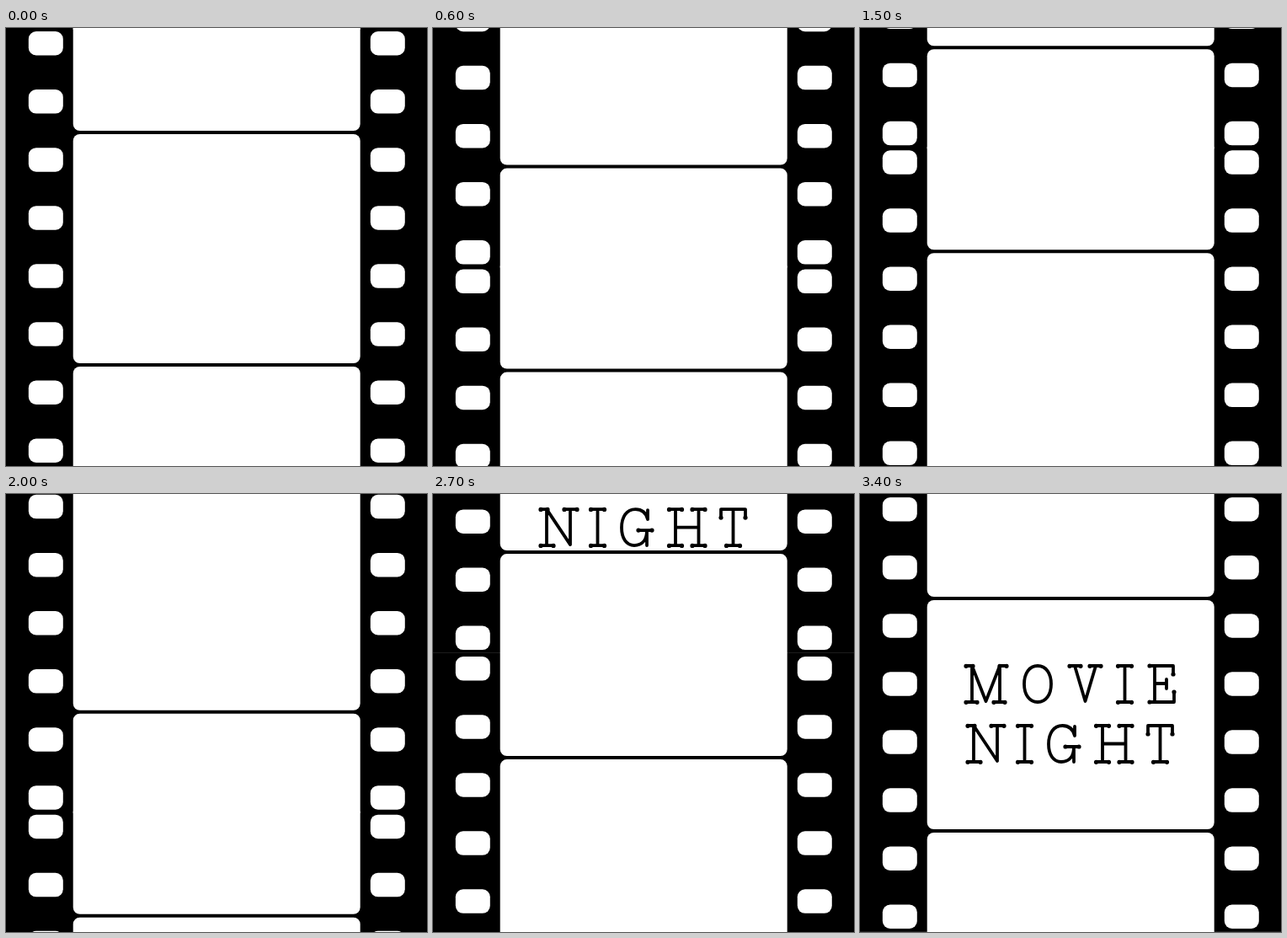
Animation of 500 by 520 pixels, one loop 3.5 s. Source, as an HTML page with a canvas:

```html
<!DOCTYPE html>
<html lang="en">
<head>
<meta charset="utf-8">
<title>Film strip</title>
<style>
  html, body { margin: 0; width: 100%; height: 100%; overflow: hidden; background: #000; }
  canvas { display: block; }
</style>
</head>
<body>
<canvas id="stage" width="500" height="520" role="img" aria-label="MOVIE NIGHT"></canvas>
<script>
const ctx = document.getElementById('stage').getContext('2d');
const STEP = 100, STEPS = 35, TITLE_START = 24;
const TOP = 204, BASE = 247, LINE = 71;

// Typewriter lettering: pen strokes plus round knobs at the serif ends.
const pen = new Path2D(), knobs = new Path2D();
const stroke = (d) => pen.addPath(new Path2D(d));
const knob = (x, y) => knobs.addPath(new Path2D(`M${x} ${y}h.01`));
function serif(x1, x2, y) {
  stroke(`M${x1} ${y}H${x2}`);
  knob(x1, y + 0.3);
  knob(x2, y + 0.3);
}
function stem(x, y) {
  stroke(`M${x} ${TOP + y}V${BASE + y}`);
}
function letterI(x, y) {
  stem(x, y);
  serif(x - 8, x + 8, TOP + y);
  serif(x - 8, x + 8, BASE + y);
}

function buildMovie() {
  stroke('M133 247V204L149.5 246L166 204V247'); // M
  serif(126, 134, TOP);
  serif(166, 174, TOP);
  serif(126, 139, BASE);
  serif(159, 172, BASE);
  stroke('M211 204C221 204 227 213 227 225.500S221 247 211 247S195 238 195 225.500S201 204 211 204Z'); // O
  stroke('M255 204L267.500 246L280 204'); // V
  serif(249, 262, TOP);
  serif(273, 286, TOP);
  letterI(314.5, 0);
  stem(350, 0); // E
  stroke('M344 204H372V214M350 225H364M364 220V231M344 247H373V235');
  knob(344, TOP);
  knob(344, BASE);
  knob(372, 214);
  knob(373, 235);
}

function buildNight() {
  const top = TOP + LINE, base = BASE + LINE;
  stroke('M135 318V275L163 317V275'); // N
  serif(128, 136, top);
  serif(156, 171, top);
  serif(128, 143, base);
  letterI(195.5, LINE);
  stroke('M255 287C253 279 248 275 240.500 275C230 275 224 284 224 297C224 310 230 318 239 318C248 318 254 312 254 300'); // G
  stroke('M255 276V287M254 300V318M244 300H260');
  knob(244, 300);
  knob(260, 300);
  for (const x of [288, 315.5]) { // H
    stem(x, LINE);
    serif(x - 7.5, x + 7.5, top);
    serif(x - 7.5, x + 7.5, base);
  }
  stroke('M288 296.500H315.500');
  stem(356.5, LINE); // T
  stroke('M342 285V275H371V285');
  knob(342, 285);
  knob(371, 285);
  serif(348.5, 364.5, base);
}

function box(x, y, w, h, r) {
  ctx.beginPath();
  ctx.roundRect(x, y, w, h, r);
  ctx.fill();
}

function drawStrip(y) {
  ctx.fillStyle = '#fff';
  box(79.7, y, 341, 122, [0, 0, 8, 8]);
  box(79.7, y + 126, 341, 272, 8);
  box(79.7, y + 402, 341, 118, [8, 8, 0, 0]);
  for (let i = 0; i < 8; i++) {
    for (const x of [26.8, 432.8]) box(x, y + 4 + i * 69.07, 41, 28.5, 9);
  }
}

function drawTitle(y) {
  ctx.save();
  ctx.translate(0, y);
  ctx.strokeStyle = '#000';
  ctx.lineCap = ctx.lineJoin = 'round';
  ctx.lineWidth = 3.8;
  ctx.stroke(pen);
  ctx.lineWidth = 5.2;
  ctx.stroke(knobs);
  ctx.restore();
}

function draw(step) {
  const titled = step >= TITLE_START;
  const pitch = titled ? 520 : 518;
  const y = (titled ? step - 23 : step % 12) * pitch / 11;
  ctx.fillStyle = '#000';
  ctx.fillRect(0, 0, 500, 520);
  if (titled) { // faint splice
    ctx.fillStyle = '#1c1c1c';
    ctx.fillRect(0, Math.floor(y) - 1, 500, 1);
  }
  drawStrip(y - pitch);
  drawStrip(y);
  if (titled) drawTitle((step - STEPS + 1) * 36.7);
}

function tick() {
  draw(Math.floor(performance.now() / STEP) % STEPS);
  requestAnimationFrame(tick);
}

buildMovie();
buildNight();
tick();
</script>
</body>
</html>
```
